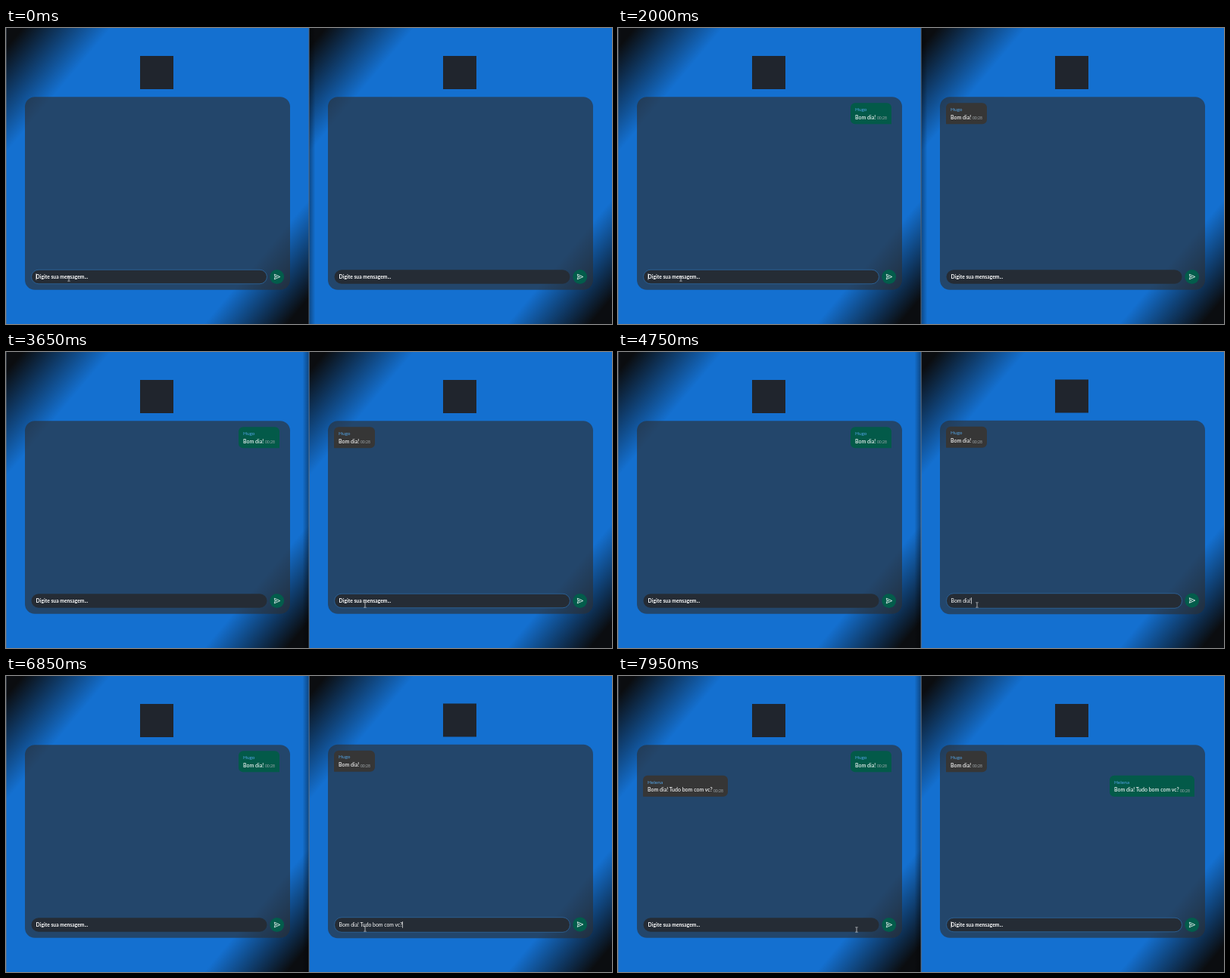
These frames come from a looping animation (800 by 392 pixels, 8 s). An HTML page:

```html
<!DOCTYPE html>
<html lang="pt">
<head>
<meta charset="utf-8">
<title>Chat</title>
<style>
html, body { margin: 0; width: 100%; height: 100%; overflow: hidden; background: #1470d0; }
svg { display: block; width: 100vw; height: 100vh; }
text { font-family: Lato, "Open Sans", sans-serif; fill: #fff; white-space: pre; }
.hint { font-size: 6.75px; font-weight: 700; }
.typed { font-size: 6.85px; }
.msg { font-size: 7px; font-weight: 500; }
.name { font-size: 6.5px; fill: #53a5e8; }
.time { font-size: 5.1px; fill: #a3aaad; text-anchor: end; }
</style>
</head>
<body>
<svg id="stage" viewBox="0 0 800 392" preserveAspectRatio="none">
  <defs>
    <linearGradient id="sky" gradientUnits="userSpaceOnUse" x1="-13.9" y1="16.5" x2="413.9" y2="375.5">
      <stop offset=".03" stop-color="#0b0d10"/>
      <stop offset=".19" stop-color="#1470d0"/>
      <stop offset=".81" stop-color="#1470d0"/>
      <stop offset=".96" stop-color="#0b0d10"/>
    </linearGradient>
    <linearGradient id="shade">
      <stop offset="0" stop-color="#000" stop-opacity=".35"/>
      <stop offset="1" stop-color="#000" stop-opacity="0"/>
    </linearGradient>
  </defs>
</svg>
<script>
const LOOP = 8000;
const FOCUS_SWAP = 2950;
const stage = document.getElementById('stage');

function add(parent, tag, attrs = {}, text) {
  const el = document.createElementNS('http://www.w3.org/2000/svg', tag);
  set(el, attrs);
  if (text) el.textContent = text;
  parent.appendChild(el);
  return el;
}
function set(el, attrs) {
  for (const key in attrs) el.setAttribute(key, attrs[key]);
}
function show(el, on) {
  el.setAttribute('visibility', on ? 'visible' : 'hidden');
}

// Speech bubble with one square bottom corner on the sender's side
function bubble(parent, mine, y, w, name, msg) {
  const g = add(parent, 'g');
  const x = mine ? 361 - w : 33, h = 28, r = 6;
  const br = mine ? 0.5 : r, bl = mine ? r : 0.5;
  add(g, 'path', {
    fill: mine ? '#035a49' : '#363636',
    d: `M${x + r} ${y}h${w - 2 * r}a${r} ${r} 0 0 1 ${r} ${r}v${h - r - br}a${br} ${br} 0 0 1 ${-br} ${br}` +
       `h${br + bl - w}a${bl} ${bl} 0 0 1 ${-bl} ${-bl}v${bl + r - h}a${r} ${r} 0 0 1 ${r} ${-r}z`
  });
  add(g, 'text', { class: 'name', x: x + 6, y: y + 10.7 }, name);
  add(g, 'text', { class: 'msg', x: x + 6, y: y + 21.6 }, msg);
  add(g, 'text', { class: 'time', x: x + w - 6, y: y + 21.9 }, '00:28');
  return g;
}

function makePane(x, first, second) {
  const g = add(stage, 'g', { transform: `translate(${x} 0)` });
  add(g, 'rect', { width: 400, height: 392, fill: 'url(#sky)' });
  add(g, 'rect', { width: 0.8, height: 392, fill: '#6c7888', opacity: 0.6 });
  const logo = add(g, 'rect', { x: 177, width: 44, height: 44, fill: '#20252d' });
  const card = add(g, 'rect', { x: 25, width: 350, rx: 13, fill: 'rgb(44,49,55)', 'fill-opacity': 0.65 });
  const list = add(g, 'g');
  const mine = first.mine;
  const bubbles = [
    bubble(list, mine, 99.2, 54, 'Hugo', 'Bom dia!'),
    bubble(list, !mine, 131.8, 112, 'Helena', 'Bom dia! Tudo bom com vc?')
  ];
  const field = add(g, 'rect', { x: 33.5, width: 311, rx: 9.5, fill: '#252c35', 'stroke-width': 0.9 });
  const hint = add(g, 'text', { class: 'hint', x: 39.6, y: 331.8 }, 'Digite sua mensagem...');
  const typed = add(g, 'text', { class: 'typed', x: 39.6, y: 331.8 });
  const caret = add(g, 'rect', { y: 325.2, width: 0.7, height: 8.4, fill: '#fff' });
  const send = add(g, 'g');
  add(send, 'circle', { cx: 357.7, cy: 329.5, r: 9.4, fill: '#035c4b' });
  add(send, 'path', {
    d: 'M354.3 326.2L361.8 329.5L354.3 332.8L355.2 329.5ZM355.2 329.5H358',
    fill: 'none', stroke: '#fff', 'stroke-width': 0.8, 'stroke-linejoin': 'round'
  });
  return { logo, card, list, bubbles, shownAt: [first.at, second.at], field, hint, typed, caret, send };
}

// Key times in ms, one per character
const drafts = [
  { text: 'Bom dia!', keys: [50, 200, 400, 550, 700, 900, 1050, 1350], sent: 1550 },
  {
    text: 'Bom dia! Tudo bom com vc?',
    keys: [3700, 3800, 3950, 4050, 4200, 4300, 4600, 4750,
           4950, 5050, 5150, 5250, 5350, 5450, 5500, 5600, 5700,
           5800, 5850, 5900, 6000, 6200, 6300, 6400, 6500],
    sent: 6900
  }
];
const panes = [
  makePane(0, { mine: true, at: 1550 }, { at: 6950 }),
  makePane(400, { mine: false, at: 1600 }, { at: 6900 })
];

add(stage, 'rect', { x: 399.4, width: 1, height: 392, fill: '#59687c', opacity: 0.75 });
const shadowRight = add(stage, 'rect', { x: 400.4, width: 8, height: 392, fill: 'url(#shade)' });
const shadowLeft = add(stage, 'rect', {
  width: 8, height: 392, fill: 'url(#shade)', transform: 'translate(399.4 0) scale(-1 1)'
});

const pointer = add(stage, 'g');
const beam = add(pointer, 'path', {
  d: 'M-1.6 -3.2H-.4L0 -2.8L.4 -3.2H1.6M0 -2.8V2.8M-1.6 3.2H-.4L0 2.8L.4 3.2H1.6',
  fill: 'none', stroke: '#e4e7ea', 'stroke-width': 0.7
});
const arrow = add(pointer, 'path', {
  d: 'M0 0V8L1.9 6.3L3.1 9L4.3 8.5L3.1 5.8H5.6Z', fill: '#fff', stroke: '#222', 'stroke-width': 0.5
});

// Pointer stops: [time, x, y]
const route = [
  [2200, 83, 332], [2850, 474, 335],
  [7300, 474, 335], [7680, 462, 376], [7930, 315, 336]
];
const ease = k => k * k * (3 - 2 * k);

function pointerAt(t) {
  const i = route.findIndex(p => t < p[0]);
  if (i === 0) return route[0].slice(1);
  if (i < 0) return route[route.length - 1].slice(1);
  const [t0, x0, y0] = route[i - 1], [t1, x1, y1] = route[i];
  const k = ease((t - t0) / (t1 - t0));
  return [x0 + (x1 - x0) * k, y0 + (y1 - y0) * k];
}

function drawPane(pane, draft, focused, focusTime, t) {
  const pressed = draft.keys.filter(k => k <= t);
  const sent = t >= draft.sent;
  const text = sent ? '' : draft.text.slice(0, pressed.length);
  const grow = text ? 0.5 : 0;

  set(pane.logo, { y: 37 - grow });
  set(pane.card, { y: 91.2 - grow, height: 255.6 + 2 * grow });
  set(pane.list, { transform: `translate(0 ${-grow})` });
  set(pane.send, { transform: `translate(0 ${-grow})` });
  set(pane.field, {
    y: 320.2 - grow, height: 18.6 + 2 * grow, stroke: focused ? '#2c6298' : 'none'
  });
  pane.bubbles.forEach((b, i) => show(b, t >= pane.shownAt[i]));

  show(pane.hint, !text);
  pane.typed.textContent = text;
  const last = sent ? draft.sent : Math.max(focusTime, ...pressed);
  show(pane.caret, focused && (t - last) % 1000 < 500);
  set(pane.caret, { x: 39.6 + (text ? pane.typed.getComputedTextLength() : 0) });
}

function draw(t) {
  const right = t >= FOCUS_SWAP;
  drawPane(panes[0], drafts[0], !right, 0, t);
  drawPane(panes[1], drafts[1], right, FOCUS_SWAP, t);
  show(shadowRight, !right);
  show(shadowLeft, right);

  const [x, y] = pointerAt(t);
  const px = x % 400;
  const overField = px > 33 && px < 344 && y > 320 && y < 339;
  set(pointer, { transform: `translate(${x} ${y})` });
  show(beam, overField);
  show(arrow, !overField);
}

const start = performance.now();
function tick() {
  draw((performance.now() - start) % LOOP);
  requestAnimationFrame(tick);
}
tick();
</script>
</body>
</html>
```
